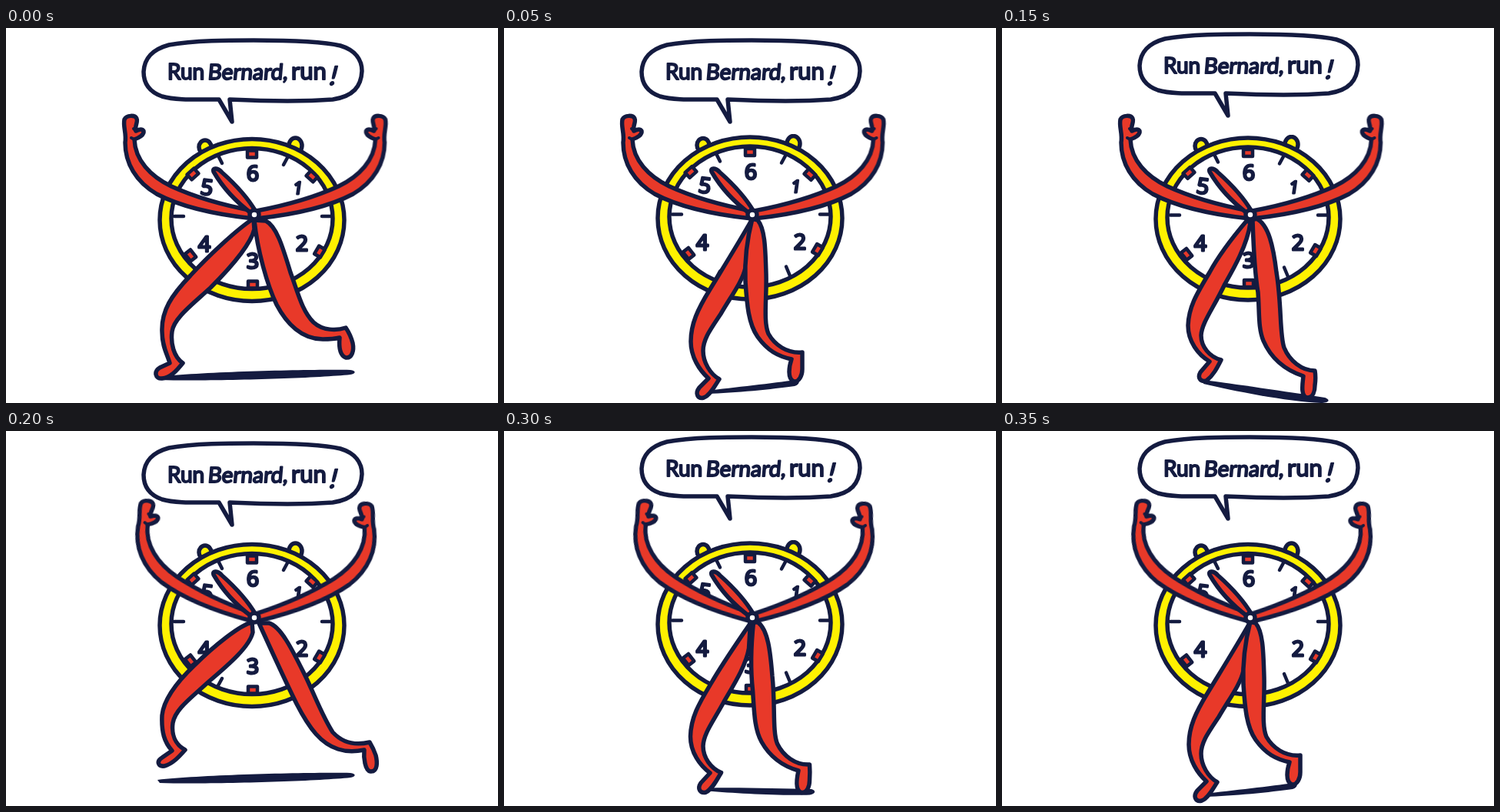
An HTML page for the animation above (400 ms loop, 640 px wide and 488 px high).

```html
<!DOCTYPE html>
<html lang="en">
<head>
<meta charset="utf-8">
<title>Running clock</title>
<style>
  html, body { margin: 0; width: 100%; height: 100%; overflow: hidden; background: #fff; }

  svg {
    --navy: #141b40;
    --red: #e83929;
    --yellow: #fff100;
    display: block; width: 100%; height: 100%;
    fill: none; stroke: var(--navy); stroke-width: 5.5;
    stroke-linejoin: round; stroke-linecap: round;

    /* Leg poses: wide, closing, passing, stretched */
    --left-wide: path("M322 248C300 262 262 298 240 322C215 348 202 368 203 395C203 415 210 425 213 436L200 442C192 447 194 457 203 456C214 455 222 446 230 436C218 428 214 410 216 395C218 378 242 360 266 338C292 312 318 282 323 262Z");
    --left-close: path("M322 250C305 280 285 312 268 340C252 366 243 385 243 408C243 428 254 445 266 456L254 468C248 476 252 483 260 481C268 478 274 466 280 457C268 450 259 435 259 420C259 405 268 393 282 372C296 348 310 330 314 312Z");
    --left-pass: path("M319 250C302 270 284 292 270 318C254 345 243 362 242 387C242 408 255 425 270 434L258 448C254 455 258 461 266 459C275 452 280 442 285 432C270 428 259 415 259 400C260 383 275 365 290 333C302 312 319 282 323 254Z");
    --left-stretch: path("M320 249C305 252 270 280 245 305C222 327 205 350 203 370C202 392 206 405 216 416L203 425C195 430 198 437 206 436C217 433 225 424 233 415C220 408 215 395 217 380C220 362 240 348 265 325C292 302 317 280 321 262Z");

    --right-wide: path("M323 250C327 290 340 335 352 360C365 385 385 405 412 405C422 405 430 404 434 403C433 414 434 426 442 429C450 430 453 420 451 410C449 402 446 396 442 390C430 394 412 394 400 383C385 368 380 345 370 318C360 285 352 258 338 251Z");
    --right-close: path("M323 248C316 275 313 305 314 330C316 360 318 385 330 402C343 420 356 427 374 431C371 440 368 456 377 460C384 461 388 452 388 444C388 436 388 428 388 422C368 424 352 412 344 398C337 382 342 350 341 320C340 290 340 262 330 250Z");
    --right-pass: path("M326 250C327 280 328 315 333 344C335 370 333 390 340 407C350 430 368 445 392 453C391 462 388 480 397 481C405 481 407 472 407 465C408 458 408 452 407 446C390 446 374 433 367 416C361 400 364 360 357 318C353 285 347 256 331 248Z");
    --right-stretch: path("M329 250C345 285 363 325 378 355C395 388 410 407 432 414C444 418 456 417 466 415C465 425 467 442 474 443C484 444 483 430 481 422C479 416 476 410 473 405C452 410 437 405 425 392C412 372 402 345 390 320C374 288 358 254 342 250Z");

    --shadow-wide: path("M197 454C260 447 400 444 448 445C456 446 455 450 448 451C400 456 260 460 200 458Z");
    --shadow-close: path("M262 472C300 468 350 462 380 458C386 460 384 464 378 466C350 470 300 475 264 476Z");
    --shadow-steep: path("M262 458C300 463 370 473 420 481C428 484 425 488 415 488C370 486 300 472 262 463Z");
    --shadow-flat: path("M266 457C300 459 370 468 420 474C427 476 426 480 418 481C370 480 300 468 268 461Z");
  }

  .red { fill: var(--red); }
  .yellow { fill: var(--yellow); }
  .white { fill: #fff; }
  .shadow { fill: var(--navy); stroke: none; }
  text { fill: var(--navy); }
  .speech { font: 28px Lato, sans-serif; stroke-width: 2; }
  .digits { font: 28px "Open Sans", sans-serif; text-anchor: middle; stroke-width: 3; }

  .bubble, .clock, .arm, .left-leg, .right-leg, .shadow {
    animation: .4s step-end infinite;
  }
  .bubble { animation-name: bob; }
  .clock { animation-name: bounce; }
  .arm { animation-name: wave; transform-origin: 323px 243px; }
  .left-leg { animation-name: left-run; }
  .right-leg { animation-name: right-run; }
  .shadow { animation-name: ground; }

  @keyframes bob {
    0%, 50%, 100% { transform: none; }
    25%, 75% { transform: translateY(-8px); }
  }
  @keyframes bounce {
    0%, 62.5%, 100% { transform: none; }
    12.5% { transform: translateY(-2.5px); }
    25%, 37.5% { transform: translateY(-1.5px); }
    50%, 87.5% { transform: translateY(3px); }
    75% { transform: translateY(1.5px); }
  }
  @keyframes wave {
    0%, 100% { transform: none; }
    50% { transform: rotate(var(--lift)); }
  }
  /* steps(2) adds the halfway pose between two key poses */
  @keyframes left-run {
    0%, 100% { d: var(--left-wide); }
    12.5% { d: var(--left-close); animation-timing-function: steps(2); }
    37.5% { d: var(--left-pass); }
    50% { d: var(--left-stretch); }
    62.5% { d: var(--left-pass); animation-timing-function: steps(2); }
    87.5% { d: var(--left-close); }
  }
  @keyframes right-run {
    0%, 100% { d: var(--right-wide); }
    12.5% { d: var(--right-close); animation-timing-function: steps(2); }
    37.5% { d: var(--right-pass); }
    50% { d: var(--right-stretch); }
    62.5% { d: var(--right-pass); animation-timing-function: steps(2); }
    87.5% { d: var(--right-close); }
  }
  @keyframes ground {
    0%, 50%, 100% { d: var(--shadow-wide); }
    12.5% { d: var(--shadow-close); animation-timing-function: steps(2); }
    37.5% { d: var(--shadow-steep); }
    62.5% { d: var(--shadow-flat); animation-timing-function: steps(2); }
    87.5% { d: var(--shadow-close); }
  }
</style>
</head>
<body>
<svg viewBox="0 0 640 488">
  <defs>
    <rect id="mark" class="red" x="-6" y="-4.5" width="12" height="9" stroke-width="4.5"/>
    <g id="limb">
      <path class="red" d="M322 238C290 232 250 222 215 206C188 193 168 172 167 145C173 143 180 139 179 134C177 131 173 132 169 134C167 128 172 122 170 118C168 113 157 113 154 119C152 128 157 138 155 149C155 176 169 200 196 216C230 234 275 243 322 248Z"/>
      <path stroke-width="4" d="M169 134L166 131M167 145L163 143"/>
    </g>
  </defs>

  <g class="bubble">
    <path class="white" d="M277 93C245 93 220 94 203 89C186 83 179 71 179 57C180 39 190 28 212 22C245 16 290 16 322 16C370 16 410 17 435 23C455 29 463 42 463 56C462 76 452 89 425 93C385 96 335 95 291 93L294 122Z"/>
    <g class="speech">
      <text x="210" y="67">Run</text>
      <text transform="translate(262 67) skewX(-5)">Bernard,</text>
      <text x="371" y="67" font-size="31">run</text>
      <text transform="translate(419 74) skewX(-14)" font-size="34">!</text>
    </g>
  </g>

  <g class="clock">
    <ellipse class="yellow" cx="259" cy="155" rx="8" ry="9"/>
    <ellipse class="yellow" cx="376.5" cy="153" rx="8.5" ry="10"/>
    <ellipse class="yellow" cx="320" cy="250" rx="120" ry="105.5"/>
    <ellipse class="white" cx="320" cy="248" rx="105" ry="91.5"/>
    <path stroke-width="4.5" d="M276 166L281 176M367 167L361 178M219 245H231M411 245H423M367 313L372 325M281 319L275 330"/>
    <use href="#mark" transform="translate(320 164)"/>
    <use href="#mark" transform="translate(398 193) rotate(42)"/>
    <use href="#mark" transform="translate(408 291) rotate(120)"/>
    <use href="#mark" transform="translate(321 334)"/>
    <use href="#mark" transform="translate(240 296) rotate(-128)"/>
    <use href="#mark" transform="translate(243 190) rotate(-42)"/>
    <g class="digits">
      <text x="321" y="199">6</text>
      <text transform="translate(379 216) skewX(-8)" font-size="22">1</text>
      <text x="385" y="290">2</text>
      <text x="321" y="313">3</text>
      <text x="258" y="291">4</text>
      <text transform="translate(260 217) rotate(8)">5</text>
    </g>
  </g>

  <path class="shadow"/>
  <use href="#limb" class="arm" style="--lift: 9deg"/>
  <g transform="translate(647.5) scale(-1 1)">
    <use href="#limb" class="arm" style="--lift: 7.5deg"/>
  </g>
  <path class="red left-leg"/>
  <path class="red right-leg"/>
  <path class="red" d="M319 241C299 226 281 206 270 187C268 181 276 182 281 188C299 204 314 220 325 239Z"/>
  <circle class="white" cx="323" cy="243" r="6"/>
</svg>
</body>
</html>
```
